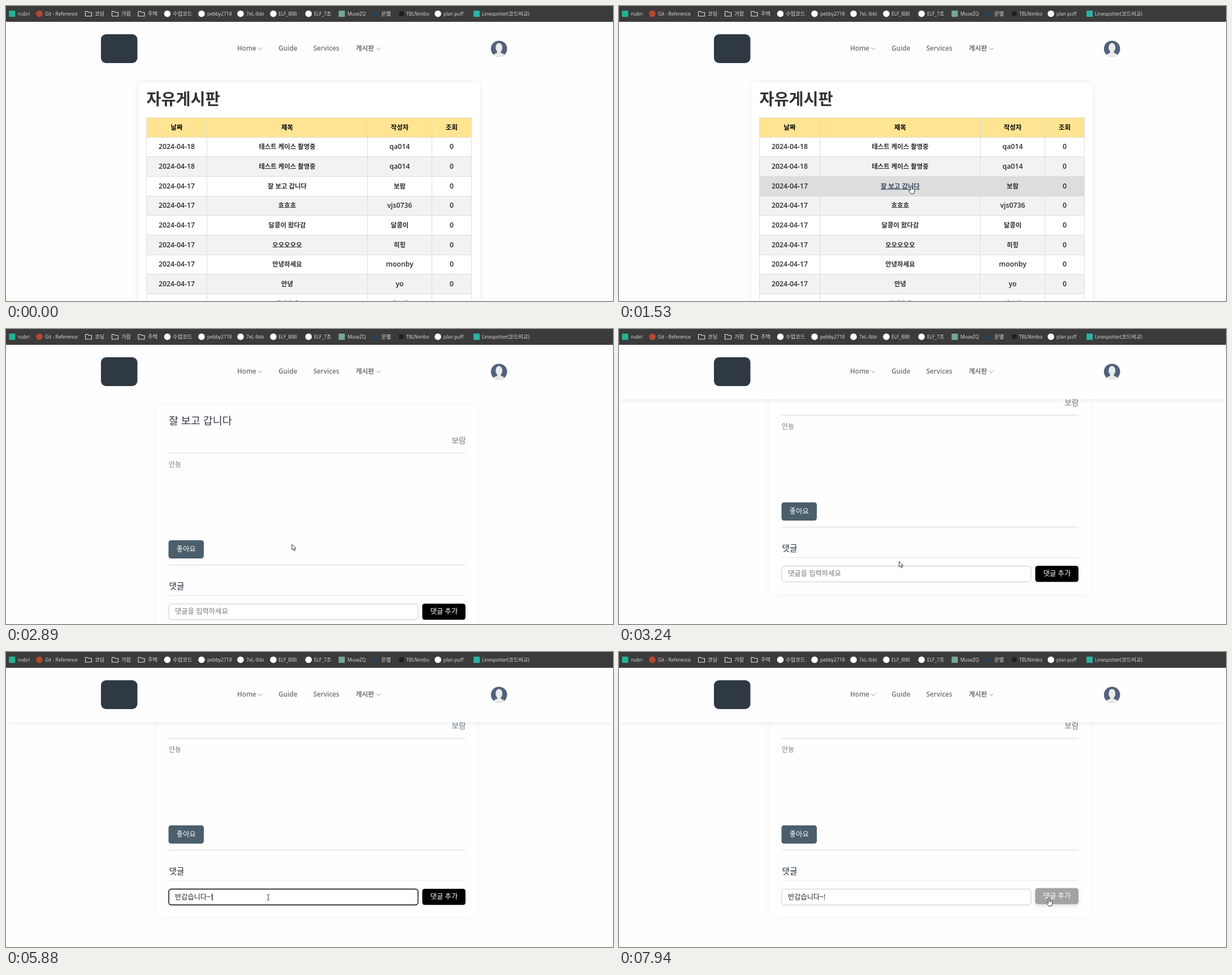
These frames come from a looping animation (1074x522 px, 8000 ms). An HTML page:

```html
<!DOCTYPE html>
<html lang="ko">
<head>
<meta charset="utf-8">
<style>
html, body { margin: 0; width: 100%; height: 100%; overflow: hidden; background: #fefefe; }
svg { display: block; font-family: 'Open Sans', 'Noto Sans CJK KR', sans-serif; }
.bar { fill: #dcdcdc; }
.mid { text-anchor: middle; }
.grid { shape-rendering: crispEdges; }
.card { filter: drop-shadow(0 0 5px rgba(0, 0, 0, .08)); }
.soft { filter: drop-shadow(0 1px 6px rgba(0, 0, 0, .045)); }
</style>
</head>
<body>
<svg id="stage" width="1074" height="522" viewBox="0 0 1074 522"></svg>
<script>
const LOOP = 8000;
const stage = document.getElementById('stage');
const $ = id => document.getElementById(id);

// ---- markup helpers ----
const text = (x, y, s, size, attrs = '') =>
  `<text x="${x}" y="${y}" font-size="${size}" ${attrs}>${s}</text>`;
const rect = (x, y, w, h, fill, attrs = '') =>
  `<rect x="${x}" y="${y}" width="${w}" height="${h}" fill="${fill}" ${attrs}/>`;
const circle = (x, y, r, fill) => `<circle cx="${x}" cy="${y}" r="${r}" fill="${fill}"/>`;
const line = (d, stroke, attrs = '') => `<path d="${d}" fill="none" stroke="${stroke}" ${attrs}/>`;

// ---- bookmark bar ----
const square = (x, fill, side = 11) => rect(x - side / 2, 13.7 - side / 2, side, side, fill);
const dot = (x, fill = '#fff') => circle(x, 13.7, 5.8, fill);
const folder = x => line(`M${x - 5.5} 9.5h4l1.5 1.8h5.5v6.7h-11z`, '#e4e4e4', 'stroke-width="1.1" stroke-linejoin="round"');
const bookmarks = [
  [21, 'nubri', square(10.8, '#20b594')],
  [69, 'Git - Reference', dot(59, '#b5482f')],
  [157, '코딩', folder(146)],
  [204, '가람', folder(193)],
  [251, '주택', folder(239.5)],
  [295, '수업코드', dot(285.5)],
  [356, 'pebby2718', dot(346)],
  [425, '7eL-Ibbi', dot(415)],
  [482, 'ELF_IBBI', dot(473)],
  [545, 'ELF_7조', dot(535.3)],
  [604, 'MuseZQ', square(594, '#76a79b')],
  [664, '온별', square(654.5, '#2c4258', 8)],
  [708, 'TBLNimbo', square(699.5, '#1e1e1e', 8)],
  [774, 'plan puff', dot(764.2)],
  [842, 'Linespotter(코드비교)', square(832.7, '#2bb3a6')]
];
const hangulSize = s => s.replace(/[가-힣]+/g, m => `<tspan font-size="9.3">${m}</tspan>`);
const bar = rect(0, 0, 1074, 28, '#3b3b3b') +
  bookmarks.map(([x, s, icon]) => icon + text(x, 16.8, hangulSize(s), 8.45, 'class="bar"')).join('');

// ---- site header ----
const chevron = x => line(`M${x} 73.7l3.8 3.8 3.8-3.8`, '#8b9095');
const menu = [[409, 'Home'], [482.3, 'Guide'], [543.7, 'Services'], [619, '게시판']];
const header = rect(0, 28, 1074, 96, '#fefefe', 'id="head"') +
  rect(168, 50, 64.5, 51, '#2e3944', 'rx="9"') +
  menu.map(([x, s]) => text(x, 79, s, 11.7, 'font-weight="600" fill="#6d7276"')).join('') +
  chevron(446) + chevron(655) +
  '<clipPath id="round"><circle cx="872.3" cy="75.7" r="14.3"/></clipPath>' +
  circle(872.3, 75.7, 14.3, '#53617c') +
  `<g clip-path="url(#round)" fill="#e9ebea"><ellipse cx="872.3" cy="73.5" rx="6" ry="8"/>
   <path d="M869 78h6.6v5q5 1 6.3 4v5h-19.2v-5q1.3-3 6.3-4z"/></g>`;

// ---- board list ----
const ROW = 34.65, TOP = 197.5, HOVER_ROW = 3;
const edges = [248.5, 355.5, 639.5, 753.5, 823.5];
const posts = [
  ['날짜', '제목', '작성자', '조회'],
  ['18', '테스트 케이스 촬영중', 'qa014'],
  ['18', '테스트 케이스 촬영중', 'qa014'],
  ['17', '잘 보고 갑니다', '보람'],
  ['17', '흐흐흐', 'vjs0736'],
  ['17', '달콩이 왔다감', '달콩이'],
  ['17', '오오오오오', '히힝'],
  ['17', '안녕하세요', 'moonby'],
  ['17', '안녕', 'yo'],
  ['17', '안녕하세.', '정소람']
];
const tableRow = (post, i) => {
  const y = TOP + i * ROW;
  const cells = i ? ['2024-04-' + post[0], post[1], post[2], '0'] : post;
  const fill = i ? (i % 2 ? '#fff' : '#f2f2f2') : '#ffe491';
  return rect(248.5, y, 575, ROW, fill, `class="grid" ${i === HOVER_ROW ? 'id="row"' : ''}`) +
    cells.map((s, c) => text((edges[c] + edges[c + 1]) / 2, y + 21.2, s,
      /[가-힣]/.test(s) ? 11.4 : 12.3,
      `class="mid" font-weight="600" fill="${i ? '#2a2a2a' : '#000'}" ${i === HOVER_ROW && c === 1 ? 'id="link"' : ''}`)).join('');
};
const rules = posts.map((_, i) => `M248 ${Math.floor(TOP + i * ROW) + .5}H824`).join('') +
  edges.map(x => `M${x} 197V522`).join('');
const list = rect(234, 135, 604, 420, '#fff', 'rx="7" class="card"') +
  text(248.5, 175.2, '자유게시판', 28.3, 'font-weight="700" fill="#333"') +
  posts.map(tableRow).join('') + line(rules, '#ddd', 'class="grid"');

// ---- post page ----
const post = rect(266, 134, 568, 401.5, '#fefefe', 'rx="8" class="soft"') +
  text(288, 168.6, '잘 보고 갑니다', 18.5, 'font-weight="300" fill="#303a46"') +
  text(813.5, 202, '보람', 13.6, 'font-weight="300" fill="#6c7a86" text-anchor="end"') +
  line('M288 219.5H813', '#d8d8d8') +
  text(288, 244.4, '안뇽', 12, 'font-weight="300" fill="#7d7d7d"') +
  rect(287.5, 373.7, 62.5, 32.3, '#4b5e6b', 'rx="4.5"') +
  text(318.8, 394.2, '좋아요', 12.3, 'class="mid" fill="#fff"') +
  line('M288 417.5H813', '#d4d7d9') +
  text(288.5, 460, '댓글', 14.7, 'font-weight="300" fill="#24303d"') +
  line('M288 471.5H813', '#e6e8ea') +
  rect(288, 486.5, 441, 28, '#fff', 'rx="4.5" id="field"') +
  text(299, 504, '댓글을 입력하세요', 12.3, 'fill="#777" id="hint"') +
  text(299, 504.6, '', 12.2, 'fill="#222" id="typed"') +
  line('', '#222', 'id="under"') + line('', '#222', 'id="caret"') +
  `<g id="send">${rect(736.5, 486, 76.5, 28.5, '#000', 'rx="4.5" id="sendBox"')}
   ${text(775, 504.3, '댓글 추가', 12.3, 'class="mid" fill="#fff"')}</g>`;

const pointers = `<g id="pointer" stroke="#222" stroke-width=".9" stroke-linejoin="round" fill="#fff">
  <path id="arrow" d="M0 0V10L2.3 8 4 11.6 5.7 10.8 4.2 7.4H7.2Z"/>
  <path id="hand" d="M-1.2 9V1.2a1.2 1.2 0 0 1 2.4 0V5.5l4 .8a1.5 1.5 0 0 1 1.1 1.6L5.6 11l-1 3H-.6L-4 9.6a1 1 0 0 1 1.4-1.4Z"/>
  <path id="beam" fill="none" d="M-2.2-5H-.6L0-4.3.6-5H2.2M0-4.3V4.3M-2.2 5H-.6L0 4.3.6 5H2.2"/></g>`;

stage.innerHTML = `<g id="list">${list}</g><g id="post">${post}</g>${header}${bar}${pointers}`;

// ---- timeline ----
const OPEN = 1940, FOCUS = 3660, BLUR = 7880, SCROLL = 67;
const keys = [
  [4070, 'ㅂ'], [4140, '바'], [4210, '배'], [4340, 'ㅂ'], [4410, '바'], [4480, '반'], [4610, '반ㄱ'],
  [4750, '반가'], [4850, '반갑'], [4940, '반갑ㅅ'], [5150, '반갑스'], [5250, '반갑습'], [5340, '반갑습ㄴ'],
  [5480, '반갑습니ㄷ'], [5810, '반갑습니다~'], [5880, '반갑습니다~!']
];
const track = [
  [520, 1064, 402], [760, 704, 355], [830, 692, 326], [1060, 692, 326], [1530, 517, 318],
  [2330, 517, 318], [2890, 506, 381], [3110, 497, 410], [3180, 497, 410], [3660, 464, 434],
  [6410, 464, 434], [7160, 760.8, 435.5]
];
const ramp = (t, a, b) => Math.min(1, Math.max(0, (t - a) / (b - a)));
const smooth = p => p * p * (3 - 2 * p);
const show = (id, on) => $(id).setAttribute('visibility', on ? 'inherit' : 'hidden');
const set = (id, attrs) => { for (const k in attrs) $(id).setAttribute(k, attrs[k]); };

function pointerAt(t) {
  const i = track.findIndex(p => p[0] > t);
  if (i < 0) return track[track.length - 1].slice(1);
  if (!i) return track[0].slice(1);
  const [t0, x0, y0] = track[i - 1], [t1, x1, y1] = track[i];
  const p = smooth(ramp(t, t0, t1));
  return [x0 + (x1 - x0) * p, y0 + (y1 - y0) * p];
}

function drawPointer(t) {
  const [x, y] = pointerAt(t);
  let kind = 'arrow';
  if (t < OPEN) kind = x < 531 ? 'hand' : 'arrow';
  else if (y > 419) kind = x < 729 ? 'beam' : x > 736 ? 'hand' : 'arrow';
  set('pointer', { transform: `translate(${x} ${y})` });
  for (const k of ['arrow', 'hand', 'beam']) show(k, t >= 520 && k === kind);
  const onLink = t < OPEN && kind === 'hand';
  set('link', { fill: onLink ? '#34495e' : '#2a2a2a', 'text-decoration': onLink ? 'underline' : 'none' });
}

function drawField(t) {
  const focus = ramp(t, FOCUS, FOCUS + 140) * (t < BLUR);
  const tone = c => c * (1 - focus);
  set('field', { stroke: `rgb(${tone(197)},${tone(202)},${tone(211)})`, 'stroke-width': 1 + focus * .4 });

  const [since, word] = keys.filter(k => k[0] <= t).pop() || [FOCUS, ''];
  const typed = $('typed');
  typed.textContent = word;
  show('hint', !word);
  const end = 299 + (word ? typed.getComputedTextLength() : 0);
  const composing = /[ㄱ-힣]$/.test(word);
  const start = composing ? 299 + (word.length > 1 ? typed.getSubStringLength(0, word.length - 1) : 0) : end;
  set('under', { d: `M${start} 506.9H${end}` });
  show('under', composing);
  set('caret', { d: `M${Math.floor(end) + .5} 494.5V507` });
  show('caret', t >= FOCUS && t < BLUR && Math.floor((t - since) / 530) % 2 === 0);
}

function draw(t) {
  show('list', t < OPEN);
  show('post', t >= OPEN);
  set('row', { fill: t >= 740 ? '#ddd' : '#fff' });

  const scroll = 1 - (1 - ramp(t, 2960, 3110)) ** 2;
  set('post', { transform: `translate(0 ${-SCROLL * scroll})` });
  $('head').style.filter = scroll ? `drop-shadow(0 2px 5px rgba(0,0,0,${.07 * scroll}))` : 'none';

  const hover = smooth(ramp(t, 6960, 7160)), gray = 163 * hover;
  set('send', { transform: `translate(0 ${-1.3 * hover})` });
  set('sendBox', { fill: `rgb(${gray},${gray},${gray})` });
  $('sendBox').style.filter = hover ? `drop-shadow(0 3px 3px rgba(0,0,0,${.12 * hover}))` : 'none';

  drawField(t);
  drawPointer(t);
}

const began = performance.now();
function tick() {
  draw((performance.now() - began) % LOOP);
  requestAnimationFrame(tick);
}
tick();
</script>
</body>
</html>
```
